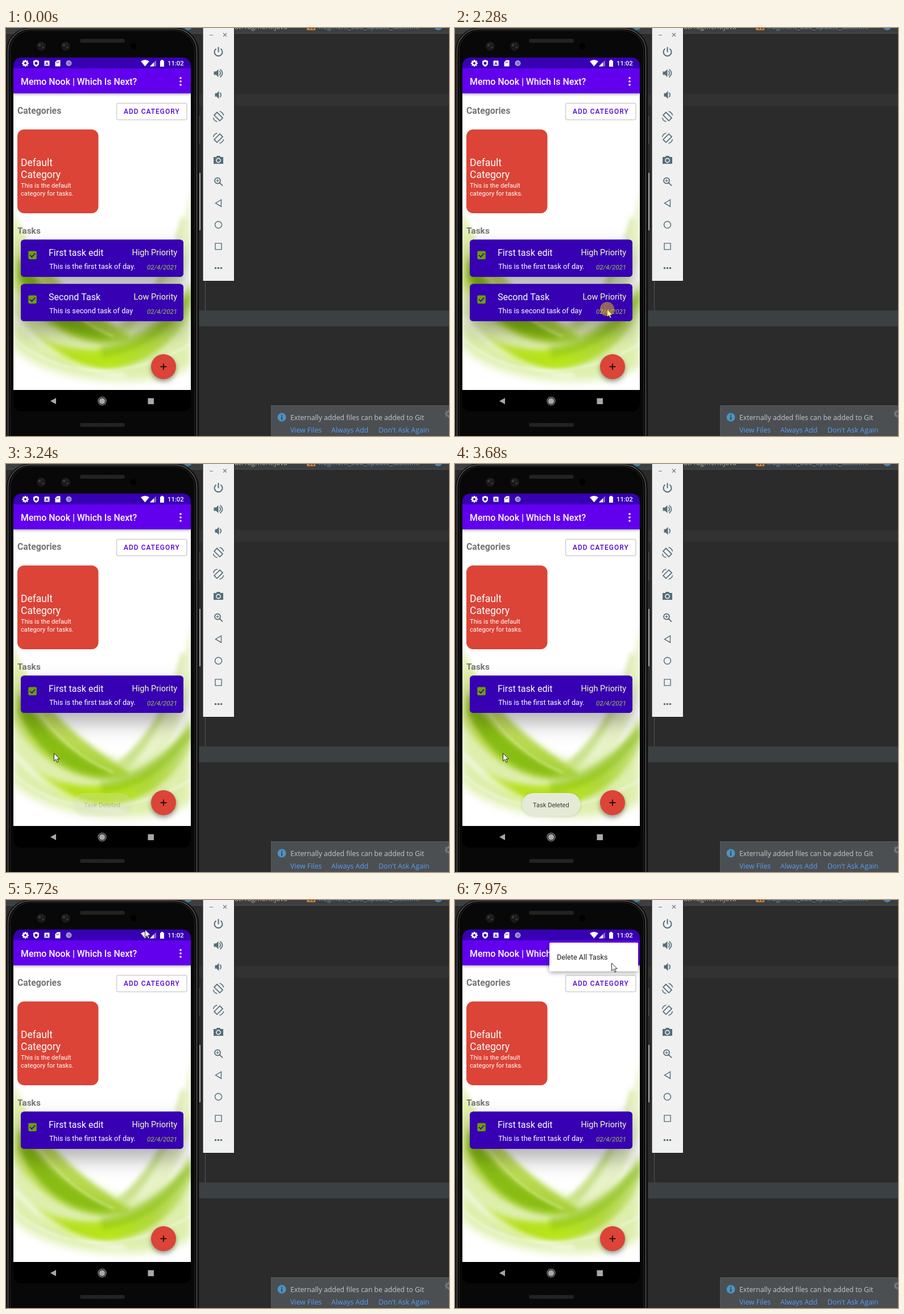
Write an HTML page with a canvas that moves like this. It is 779 px wide and 718 px high and loops after 8000 ms.

```html
<!DOCTYPE html>
<html lang="en">
<head>
<meta charset="utf-8">
<title>Task list demo</title>
<style>
html, body { margin: 0; width: 779px; height: 718px; overflow: hidden; background: #2b2b2b; }
canvas { display: block; }
</style>
</head>
<body>
<canvas id="stage" width="779" height="718"></canvas>
<script>
const W = 779, H = 718, LOOP = 8000;
const PURPLE = '#3700b3', RED = '#db4437';
const UI = '"Open Sans", "Noto Sans", sans-serif';
const APP = 'Roboto, "Noto Sans", sans-serif';
const view = document.getElementById('stage').getContext('2d');
const base = document.createElement('canvas');
base.width = W;
base.height = H;
let g = base.getContext('2d');

function rect(x, y, w, h, color) {
  g.fillStyle = color;
  g.fillRect(x, y, w, h);
}
function round(x, y, w, h, r, color, line) {
  g.beginPath();
  g.roundRect(x, y, w, h, r);
  if (color) { g.fillStyle = color; g.fill(); }
  if (line) { g.strokeStyle = line; g.stroke(); }
}
function disc(x, y, r, color) {
  g.beginPath();
  g.arc(x, y, r, 0, 7);
  g.fillStyle = color;
  g.fill();
}
function shape(d, color, blur = 0) {
  g.filter = blur ? `blur(${blur}px)` : 'none';
  g.fillStyle = color;
  g.fill(new Path2D(d), 'evenodd');
  g.filter = 'none';
}
function line(d, color, width = 1.4, blur = 0) {
  g.filter = blur ? `blur(${blur}px)` : 'none';
  g.strokeStyle = color;
  g.lineWidth = width;
  g.stroke(new Path2D(d));
  g.filter = 'none';
  g.lineWidth = 1;
}
function text(str, x, y, size, color, style = '', family = APP, align = 'left') {
  g.font = `${style} ${size}px ${family}`;
  g.textAlign = align;
  g.fillStyle = color;
  g.fillText(str, x, y);
}
function shadow(blur, dy, alpha, draw) {
  g.save();
  g.shadowColor = `rgba(0,0,0,${alpha})`;
  g.shadowBlur = blur;
  g.shadowOffsetY = dy;
  draw();
  g.restore();
}
function at(x, y, draw) {
  g.save();
  g.translate(x, y);
  draw();
  g.restore();
}
function fade(x0, y0, x1, y1, ...colors) {
  const f = g.createLinearGradient(x0, y0, x1, y1);
  colors.forEach((c, i) => f.addColorStop(i / (colors.length - 1), c));
  return f;
}
function gear(r, color, hole) {
  for (let i = 0; i < 4; i++) {
    g.save();
    g.rotate(i * Math.PI / 4);
    rect(-r * .2, -r, r * .4, r * 2, color);
    g.restore();
  }
  disc(0, 0, r * .76, color);
  disc(0, 0, r * .34, hole);
}

function drawEditor() {
  rect(0, 0, W, H, '#2b2b2b');
  rect(0, 0, W, 9, '#3c3f41');
  rect(0, 9, W, 1, '#4a4d4f');
  rect(339, 116, W, 21, '#323232');
  rect(339, 497, W, 28, '#3b4042');
  rect(350, 446, 1, 51, '#555');
  rect(340, 155, 1, 50, '#555');
  rect(340, 255, 2, 101, '#a5a5a5');
  disc(320, -3, 7, '#4682a5');
  disc(760, -3, 7, '#4f84ad');
  rect(529, 0, 15, 4, '#c57838');
  rect(534, 0, 2, 2, '#3c3f41');
  rect(539, 0, 2, 2, '#3c3f41');
  text('StatFragment.java', 495, 2, 12.4, '#a3b0a0', '', UI, 'right');
  text('fragment_add_update_task.xml', 549, 2, 12.2, '#5d8fbd', '', UI);

  rect(466, 664, 313, 54, '#4b4f51');
  g.strokeStyle = '#565a5c';
  g.strokeRect(466.5, 664.5, 330, 60);
  disc(485, 685, 7.5, '#4b93c5');
  rect(484, 683.5, 2, 6, '#3d4143');
  rect(484, 680.5, 2, 2, '#3d4143');
  at(778, 679, () => gear(6.5, '#747879', '#4b4f51'));
  text('Externally added files can be added to Git', 500, 690, 12.2, '#c3c8cc', '', UI);
  text('View Files', 500, 712, 12.3, '#589df6', '', UI);
  text('Always Add', 572, 712, 12.3, '#589df6', '', UI);
  text("Don't Ask Again", 655, 712, 12.3, '#589df6', '', UI);
}

function drawPanel() {
  const c = '#546e7a';
  rect(345.5, 0, 56.5, 446, '#1b1b1b');
  rect(346.5, 0, 54.5, 445, '#f0f0f0');
  line('M358 12.5H364', '#777', 1);
  line('M382 9L388 15M388 9L382 15', '#777', 1.1);
  const icons = [
    () => line('M-4 -5A7 7 0 1 0 4 -5M0 -8V1', c, 2),
    () => {
      shape('M-8 -3H-4L0 -7V7L-4 3H-8Z', c);
      line('M2 -4Q5 0 2 4M3 -7Q11 0 3 7', c, 1.7);
    },
    () => {
      shape('M-6 -3H-3L1 -7V7L-3 3H-6Z', c);
      line('M3 -4Q6 0 3 4', c, 1.7);
    },
    () => turn(1),
    () => turn(-1),
    () => {
      shape('M-8.5 -5H-4L-2.5 -7H2.5L4 -5H8.5V7H-8.5Z', c);
      disc(0, 1, 4.4, '#f0f0f0');
      disc(0, 1, 2.8, c);
    },
    () => {
      line('M3.5 -1.5A5 5 0 1 1 -6.5 -1.5A5 5 0 1 1 3.5 -1.5M2 2L7.5 7.5', c, 1.8);
      line('M-4 -1.5H1M-1.5 -4V1', c, 1.2);
    },
    () => line('M5 -6V6L-5 0Z', c),
    () => line('M6 0A6 6 0 1 1 -6 0A6 6 0 1 1 6 0', c),
    () => line('M-5.5 -5.5H5.5V5.5H-5.5Z', c),
    () => [-5, 0, 5].forEach(x => disc(x, 0, 1.8, c))
  ];
  function turn(side) {
    g.scale(side, 1);
    line('M-7.5 -2.5L-2.5 -7.5L7.5 2.5L2.5 7.5Z', c, 1.7);
    line('M2 -9A9 9 0 0 1 9 -2M-2 9A9 9 0 0 1 -9 2', c, 1.5);
  }
  icons.forEach((icon, i) => at(373.5, 41.5 + i * 38.1, icon));
}

function drawPhone() {
  round(.5, -.5, 338.5, 770, 42, '#0a0a0a', '#1c1c1c');
  g.lineWidth = 1.5;
  round(3.5, 1.5, 332, 770, 39, null, '#585858');
  g.lineWidth = 1;
  round(7.5, 4.5, 324, 770, 36, '#080808', '#262626');
  for (const y of [19, 695]) {
    round(130, y, 79, 7, 3, '#1d1d1d');
    for (let x = 132; x < 207; x += 4) line(`M${x} ${y + 1}L${x + 3} ${y + 6}M${x + 3} ${y + 1}L${x} ${y + 6}`, '#2d2d2d', 1);
  }
  for (const x of [62, 105]) {
    disc(x, 32, 8, '#191919');
    disc(x - 3, 30, 2.4, '#393939');
    disc(x + 3, 34, 2, '#343434');
    disc(x + 2, 28, 1.5, '#2d2d2d');
  }
  disc(224, 32, 5.5, '#000');
  round(13, 52, 312, 623, 14, '#000');
  const grey = '#a8a8a8';
  shape('M88 651V662L78 656.5Z', grey);
  disc(169, 656.5, 5.3, grey);
  line('M176 656.5A7 7 0 1 1 162 656.5A7 7 0 1 1 176 656.5', grey, 1.1);
  rect(249.5, 651.5, 10.5, 10.5, grey);
}

function drawWallpaper() {
  rect(13, 115, 312, 522, '#fff');
  shape('M326 270C312 390 270 470 175 545L230 565C280 520 312 450 326 390Z', 'rgba(218,235,165,.6)', 5);
  shape('M309 330C288 420 245 490 180 540L198 550C255 500 290 430 314 340Z', 'rgba(165,205,65,.45)', 4);
  shape('M12 335C60 440 140 520 240 530C285 505 315 470 326 440V595C260 640 70 625 12 560Z', 'rgba(208,233,138,.7)', 8);
  shape('M12 316C38 400 100 470 220 545C170 575 60 540 12 450Z', fade(13, 320, 170, 555, '#eef7cc', '#c5e061', '#a9d23a'), 5);
  shape('M24 402C60 465 115 510 188 547C120 552 58 515 22 438Z', '#88bd14', 5);
  shape('M45 535C110 575 180 575 235 545C280 520 310 480 326 448V490C300 555 245 595 180 600C120 603 75 580 45 535Z',
    fade(45, 0, 325, 0, '#d2eb80', '#b6e01f', '#b7e519', '#b0d83c', '#c3de7c'), 5);
  shape('M165 560C230 550 285 505 326 462V480C285 535 240 570 170 580Z', 'rgba(125,180,15,.4)', 4);
  shape('M12 590C60 622 140 632 210 640H12Z', 'rgba(255,255,255,.85)', 6);
  line('M13 508C60 562 120 606 210 612', 'rgba(255,255,255,.6)', 8, 4);
  line('M13 545C90 618 220 622 326 555', 'rgba(255,255,255,.4)', 4, 2);
  line('M28 385C65 460 120 515 190 543', 'rgba(238,250,190,.5)', 3, 2);
}

function drawCard(y, title, body, level) {
  shadow(34, 18, .3, () => round(26, y, 286, 65.5, 6, PURPLE));
  round(26, y, 286, 65.5, 6, PURPLE);
  round(39.3, y + 20, 14.5, 14.5, 2, '#6b9f00');
  line(`M42 ${y + 27}L45.4 ${y + 30.4}L51.2 ${y + 24}`, PURPLE, 1.7);
  text(title, 75, y + 28, 16, '#fff');
  text(body, 76, y + 51, 12.75, '#fff');
  text(level, 301, y + 27, 14.5, '#f8ffbb', '', APP, 'right');
  text('02/4/2021', 301, y + 52.5, 11.5, '#9fc440', 'italic', APP, 'right');
}

function drawStatus() {
  round(13, 52, 312, 19, [14, 14, 0, 0], PURPLE);
  at(34, 62, () => gear(6, '#fff', PURPLE));
  shape('M53 56L58 58V62Q58 66 53 68Q48 66 48 62V58ZM53 59L50.5 61V63L53 65L55.5 63V61Z', '#fff');
  round(67.5, 57.5, 9, 9, 1, '#fff');
  text('A', 72, 65, 8, PURPLE, '700', APP, 'center');
  shape('M90 56.5H95.5V67.5H86.5V60ZM89 59.5V62H90V59.5ZM91.5 59V62H92.5V59Z', '#fff');
  disc(110.5, 62, 5, '#a9a0d0');
  disc(111, 62, 3, '#8174bd');
  shape('M237 58.5Q244.5 53.5 252 58.5L244.5 67.5Z', '#fff');
  shape('M264 56.5V67.5H253Z', 'rgba(255,255,255,.4)');
  shape('M260 60.5V67.5H253Z', '#fff');
  shape('M273 56H276V57.5H278V68H271V57.5H273Z', '#fff');
  text('11:02', 284, 66, 11.3, '#fff', '500');
}

function drawApp() {
  g.save();
  g.beginPath();
  g.rect(13, 52, 312, 585);
  g.clip();
  drawWallpaper();
  shadow(4, 2, .3, () => rect(13, 71, 312, 44, '#6200ee'));
  drawStatus();
  text('Memo Nook | Which Is Next?', 26, 100, 15.9, '#fff', '500');
  [88, 94, 100].forEach(y => disc(307, y, 1.8, '#fff'));
  text('Categories', 20, 151, 15.8, '#757575', '700');
  g.lineWidth = 1.5;
  round(194.5, 132.5, 123.5, 29, 3, '#fff', '#d0d0d0');
  g.lineWidth = 1;
  g.letterSpacing = '1.06px';
  text('ADD CATEGORY', 207, 151, 11.9, '#5600d8', '500');
  g.letterSpacing = '0px';
  round(20, 178.5, 142.5, 147.5, 12, RED);
  text('Default', 26, 243, 17.5, '#fff');
  text('Category', 26, 264, 17.5, '#fff');
  text('This is the default', 26, 281, 11.2, '#fff');
  text('category for tasks.', 26, 294.5, 11.2, '#fff');
  text('Tasks', 20, 362, 15.5, '#757575', '700');
  drawCard(372.5, 'First task edit', 'This is the first task of day.', 'High Priority');
  shadow(8, 4, .4, () => disc(277, 596, 22, RED));
  line('M271.5 596H282.5M277 590.5V601.5', '#000', 1.6);
  g.restore();
}

// Pointer strokes: first change, last change, steps, control point, end point
const strokes = [
  [70, 420, 6, 520, 560, 218, 424],
  [890, 1490, 9, 225, 380, 267, 495],
  [2440, 2752, 5, 180, 500, 84, 509],
  [5260, 5720, 7, 130, 200, 244, 52],
  [5796, 5940, 3, 255, 35, 275, 68],
  [6020, 6490, 7, 290, 75, 305, 91],
  [6800, 7180, 5, 299, 86, 305, 91],
  [7440, 7590, 3, 305, 95, 303, 97],
  [7670, 7970, 5, 292, 102, 275, 111]
];
const ENTRY = [812, 722], PRESS = 2280, RELEASE = 2830;

const ramp = (t, a, b) => Math.min(1, Math.max(0, (t - a) / (b - a)));

function stepped(t, from, to, steps) {
  if (t < from) return 0;
  const done = Math.floor((t - from) / (to - from) * (steps - 1) + .02) + 1;
  return Math.min(1, done / steps);
}
function pointer(t) {
  let [x, y] = ENTRY;
  for (const [from, to, steps, cx, cy, ex, ey] of strokes) {
    if (t < from) break;
    const s = stepped(t, from, to, steps);
    const p = s * s * (3 - 2 * s), q = 1 - p;
    x = q * q * x + 2 * p * q * cx + p * p * ex;
    y = q * q * y + 2 * p * q * cy + p * p * ey;
  }
  return [x, y];
}
function swipe(t) {
  if (t < 2440) return 0;
  const drag = pointer(Math.min(t, RELEASE))[0] - 267;
  return drag + (-312 - drag) * stepped(t, RELEASE, 2990, 3);
}

function drawToast(alpha) {
  g.save();
  g.globalAlpha = alpha;
  shadow(5, 1, .14, () => round(118, 579, 102.5, 40, 20, '#e5ead7'));
  text('Task Deleted', 137, 603.5, 11.1, '#3a3a3a');
  g.restore();
}
function drawMenu(p) {
  g.save();
  g.globalAlpha = p;
  g.translate(322, 75);
  g.scale(.6 + .4 * p, .4 + .6 * p);
  g.translate(-322, -75);
  shadow(8, 2, .38, () => round(166, 75, 156, 50.5, 2, '#fff'));
  text('Delete All Tasks', 179, 105, 12.65, '#212121');
  g.restore();
}
function drawCursor(x, y, pressed) {
  at(x + .5, y, () => {
    const arrow = 'M0 0V13.6L3.2 10.7L5.5 16L7.7 15L5.4 10H9.8Z';
    shape(arrow, '#fff');
    line(arrow, '#111', .9);
    if (pressed) disc(0, -.5, 12.5, 'rgba(255,225,0,.45)');
  });
}

function render(t) {
  g = view;
  g.drawImage(base, 0, 0);
  if (t < 3150) {
    g.save();
    g.beginPath();
    g.rect(13, 115, 312, 522);
    g.clip();
    at(swipe(t), 0, () =>
      drawCard(450.5, 'Second Task', 'This is second task of day', 'Low Priority'));
    g.restore();
  }
  const toast = ramp(t, 3090, 3680) * (1 - ramp(t, 5110, 5680) ** 2);
  if (t >= 3150 && toast > 0) drawToast(toast);
  const menu = stepped(t, 7440, 7590, 3);
  if (menu > 0) drawMenu(menu);
  if (t >= strokes[0][0]) {
    const pressed = (t >= PRESS && t < RELEASE) || (t >= 7360 && t < 7440);
    drawCursor(...pointer(t), pressed);
  }
}

drawEditor();
drawPhone();
drawApp();
drawPanel();

let start;
function tick(now) {
  start ??= now;
  render((now - start) % LOOP);
  requestAnimationFrame(tick);
}
render(0);
requestAnimationFrame(tick);
</script>
</body>
</html>
```
